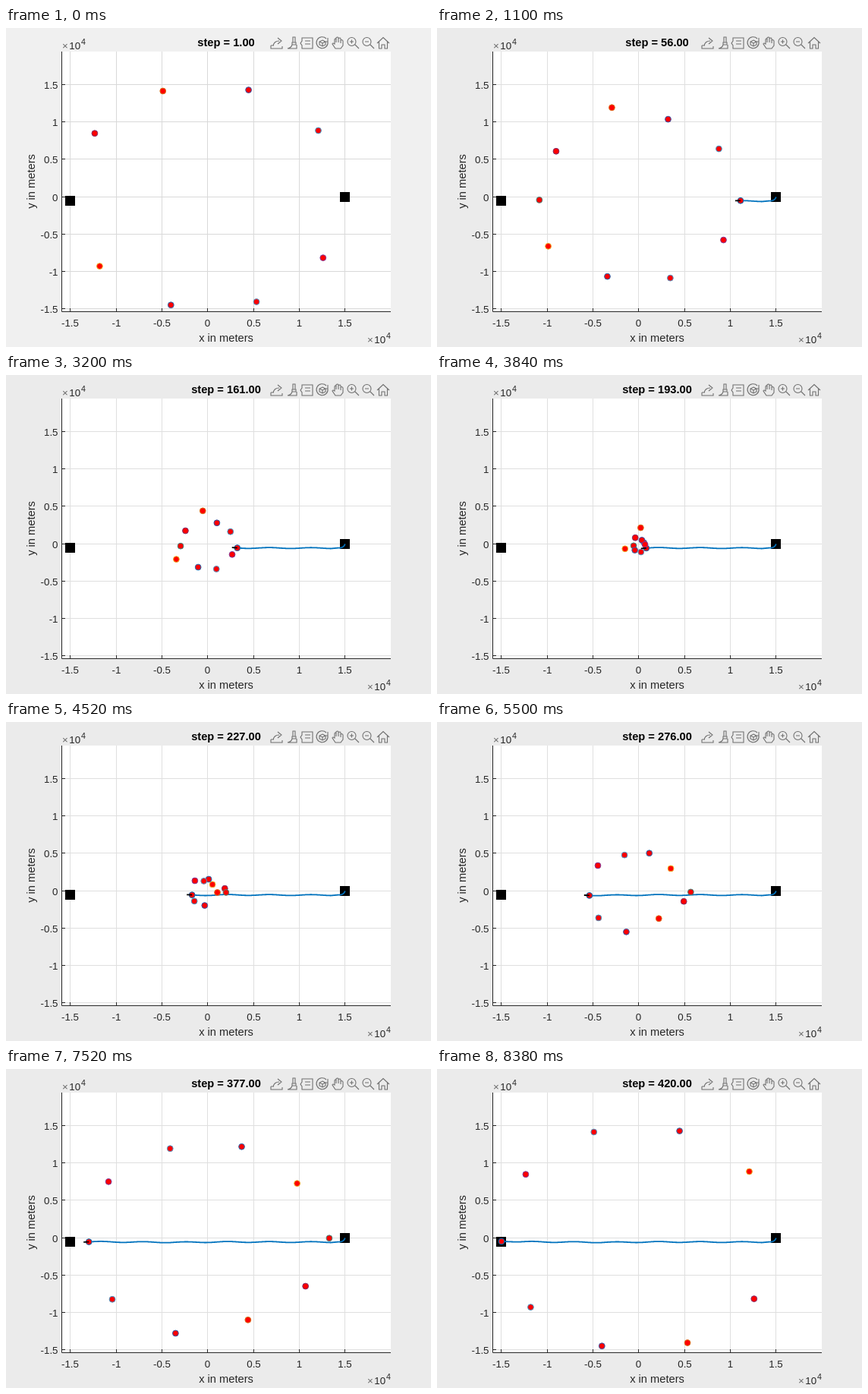
An HTML page with a canvas that plays this animation: 560 by 420 pixels, repeating every 8.4 s.

```html
<!DOCTYPE html>
<html lang="en">
<head>
<meta charset="utf-8">
<title>Crossing paths</title>
<style>
html, body { margin: 0; width: 560px; height: 420px; overflow: hidden; background: #ebebeb; }
canvas { display: block; }
</style>
</head>
<body>
<canvas id="stage" width="560" height="420"></canvas>
<script>
const ctx = document.getElementById('stage').getContext('2d');
const FONT = '"Liberation Sans", Arial, sans-serif';
const STEPS = 420, STEP_MS = 20;
const DARK = '#262626', BLUE = '#0072bd';

// World units are metres with y upwards.
const CENTER = { x: 265.8, y: 222.5 };
const TICK = { x: 60.3, y: 49.2 };  // pixels per 5000 m
const RING = 15000;                 // radius of the starting circle
const SPACING = 36.35 * Math.PI / 180;
const SPEED = 75.2, TURN_RADIUS = 630;

// turn: initial heading relative to the course; swerve: sidestep near the centre, to the left
const planes = [
  { turn: 1.4, swerve: 60, edge: BLUE },
  { turn: -0.48, swerve: 0, edge: '#3a9ccc' },
  { turn: -0.6, swerve: 60, edge: '#2b59b0' },
  { turn: 2.7, swerve: 150, edge: '#d9731a' },
  { turn: -0.76, swerve: 1520, edge: '#7e2f6e' },
  { turn: 0, swerve: 0, edge: '#3f8a80' },
  { turn: 2.35, swerve: 140, edge: '#edb120' },
  { turn: 1.5, swerve: 400, edge: '#1c6fb8' },
  { turn: 1.8, swerve: -230, edge: '#4a9fd0' },
  { turn: -0.7, swerve: -90, edge: '#7e3a9e' }
];

const smooth = u => u * u * (3 - 2 * u);
const clamp = u => Math.max(0, Math.min(1, u));
const toPixel = p => [CENTER.x + p.x * TICK.x / 5000, CENTER.y - p.y * TICK.y / 5000];

// Point on the opening turn after sweeping angle a.
function onTurn(p, a) {
  const side = Math.sign(p.turn), h = p.heading, k = h - side * a;
  return {
    x: p.start.x + TURN_RADIUS * side * (Math.sin(h) - Math.sin(k)),
    y: p.start.y + TURN_RADIUS * side * (Math.cos(k) - Math.cos(h))
  };
}

planes.forEach((p, i) => {
  p.start = { x: RING * Math.cos(i * SPACING), y: RING * Math.sin(i * SPACING) };
});
planes.forEach((p, i) => {
  p.goal = planes[(i + 5) % 10].start;
  p.exit = p.start;
  // Settle on the turn whose exit faces the goal.
  for (let n = 0; n < 20; n++) {
    p.course = Math.atan2(p.goal.y - p.exit.y, p.goal.x - p.exit.x);
    p.heading = p.course + p.turn;
    p.exit = onTurn(p, Math.abs(p.turn));
  }
  p.turnLength = Math.abs(p.turn) * TURN_RADIUS;
  p.length = Math.hypot(p.goal.x - p.exit.x, p.goal.y - p.exit.y);
});

function place(p, step) {
  const flown = SPEED * (step - 1);
  if (flown < p.turnLength) return onTurn(p, flown / TURN_RADIUS);
  const rise = smooth(clamp((step - 165) / 90));
  const along = flown - p.turnLength - 0.5 * Math.abs(p.swerve) * rise;
  const left = 1 - along / p.length;
  if (left <= 0) return p.goal;
  const off = p.swerve * rise * Math.min(1, 2.7 * left);
  const c = Math.cos(p.course), s = Math.sin(p.course);
  return { x: p.exit.x + along * c - off * s, y: p.exit.y + along * s + off * c };
}

const arrived = (p, step) => place(p, step) === p.goal;

// The leading plane weaves slightly around its course.
function leadPixel(step) {
  const [x, y] = toPixel(place(planes[0], step));
  const fade = Math.min(clamp((438 - x) / 10), clamp((x - 85) / 30));
  return [x, y + fade * (0.3 + 0.6 * Math.cos(2 * Math.PI * (x - 430) / 55.3))];
}
const trail = Array.from({ length: STEPS }, (_, i) => leadPixel(i + 1));

function text(str, x, y, size, align = 'center', color = DARK, weight = '') {
  ctx.font = `${weight} ${size}px ${FONT}`;
  ctx.textAlign = align;
  ctx.fillStyle = color;
  ctx.fillText(str, x, y);
}

function line(pts, color, width) {
  ctx.beginPath();
  pts.forEach(([x, y], i) => i ? ctx.lineTo(x, y) : ctx.moveTo(x, y));
  ctx.strokeStyle = color;
  ctx.lineWidth = width;
  ctx.stroke();
}

function power(x, y) {
  text('×', x, y, 13.33, 'left', '#666');
  text('10', x + 9.3, y, 13.33, 'left');
  text('4', x + 25, y - 6, 10.67, 'left');
}

function axes(first) {
  ctx.fillStyle = first ? '#f0f0f0' : '#ebebeb';
  ctx.fillRect(0, 0, 560, 420);
  ctx.fillStyle = '#fff';
  ctx.fillRect(73, 31, 434, 343);
  const grid = first ? '#d9d9d9' : '#dfdfdf';
  const marks = [];
  for (let i = -3; i <= 3; i++) {
    marks.push({
      label: i / 2,
      x: Math.floor(CENTER.x + i * TICK.x) + 0.5,
      y: Math.floor(CENTER.y - 0.45 - i * TICK.y) + 0.5
    });
  }
  for (const { x, y } of marks) {
    line([[x, 31], [x, 373]], grid, 1);
    line([[74, y], [507, y]], grid, 1);
  }
  line([[73.5, 31], [73.5, 373.5], [507, 373.5]], DARK, 1);
  for (const { label, x, y } of marks) {
    line([[x, 373], [x, 369]], DARK, 1);
    line([[74, y], [78, y]], DARK, 1);
    text(label, x, 393, 13.33);
    text(label, 68.5, y + 5, 13.33, 'right');
  }
  text('x in meters', 290, 413, 14.67);
  ctx.save();
  ctx.translate(38, 202);
  ctx.rotate(-Math.PI / 2);
  text('y in meters', 0, 0, 14.67);
  ctx.restore();
  power(74, 28);
  power(476, 415);
}

const LENS = 'M4 -2A5.5 5.5 0 1 1 -7 -2A5.5 5.5 0 1 1 4 -2M3 2L8 7M-4 -2H1';
const icons = [
  'M-8 3V7H7V4M-8 3H-4M-5 3C-4 -1 -1 -3 3 -3M1 -7L6 -3L1 1',
  'M1 -8H4V-1H1ZM0 -1H5V2H0ZM0 2Q-1 6 -6 7H6V2',
  'M-7 -7H7V7H-7V3L-9 0L-7 -3ZM-3 -3H4M-3 1H4',
  'M5 -6A7.5 7.5 0 1 0 7 -2M7 -7V-2H2M0 -4L4 -2V2L0 4L-4 2V-2ZM-4 -2L0 0L4 -2M0 0V4',
  'M-3 7L-7 1Q-7 -1 -4 1V-5Q-3 -7 -2 -5V-1V-7Q0 -9 1 -7V-1V-6Q3 -8 4 -6V0V-4Q6 -5 7 -3V3L4 7Z',
  LENS + 'M-1.5 -4.5V.5',
  LENS,
  'M-8 0L0 -7.5L8 0M-5.5 -2V7H-2V2H2V7H5.5V-2'
].map(d => new Path2D(d));

function toolbar() {
  ctx.strokeStyle = '#707070';
  ctx.lineWidth = 1.1;
  icons.forEach((icon, i) => {
    ctx.save();
    ctx.translate(357 + 20 * i, 20);
    ctx.stroke(icon);
    ctx.restore();
  });
}

function dot([x, y], edge) {
  ctx.beginPath();
  ctx.arc(x, y, 3.9, 0, 2 * Math.PI);
  ctx.fillStyle = '#f00';
  ctx.fill();
  ctx.strokeStyle = edge;
  ctx.lineWidth = 1;
  ctx.stroke();
}

function square(p) {
  const [x, y] = toPixel(p.start);
  ctx.fillStyle = '#000';
  ctx.fillRect(Math.round(x - 6.5), Math.round(y - 6.5), 13, 13);
}

function draw(step) {
  const first = step === 1;
  const lead = planes[0], rival = planes[5];
  axes(first);
  text(`step = ${step.toFixed(2)}`, 290, 24, 14.67, 'center', '#000', 'bold');
  toolbar();
  square(lead);
  square(rival);
  if (!first) line(trail.slice(0, step), BLUE, 1.8);

  for (const p of planes) {
    if (first && (p === lead || p === rival)) continue;
    if (p === rival && arrived(p, step)) continue;
    dot(p === lead ? trail[step - 1] : toPixel(place(p, step)), p.edge);
  }

  if (!first && !arrived(lead, step)) {
    const [x, y] = trail[step - 1];
    const [px, py] = trail[step - 2];
    const k = 7 / Math.hypot(x - px, y - py);
    line([[x, y], [x + (x - px) * k, y + (y - py) * k]], '#000', 1.8);
  }
}

const start = performance.now();
function tick() {
  const t = Math.max(0, performance.now() - start);
  draw(Math.floor(t / STEP_MS) % STEPS + 1);
  requestAnimationFrame(tick);
}
tick();
</script>
</body>
</html>
```
